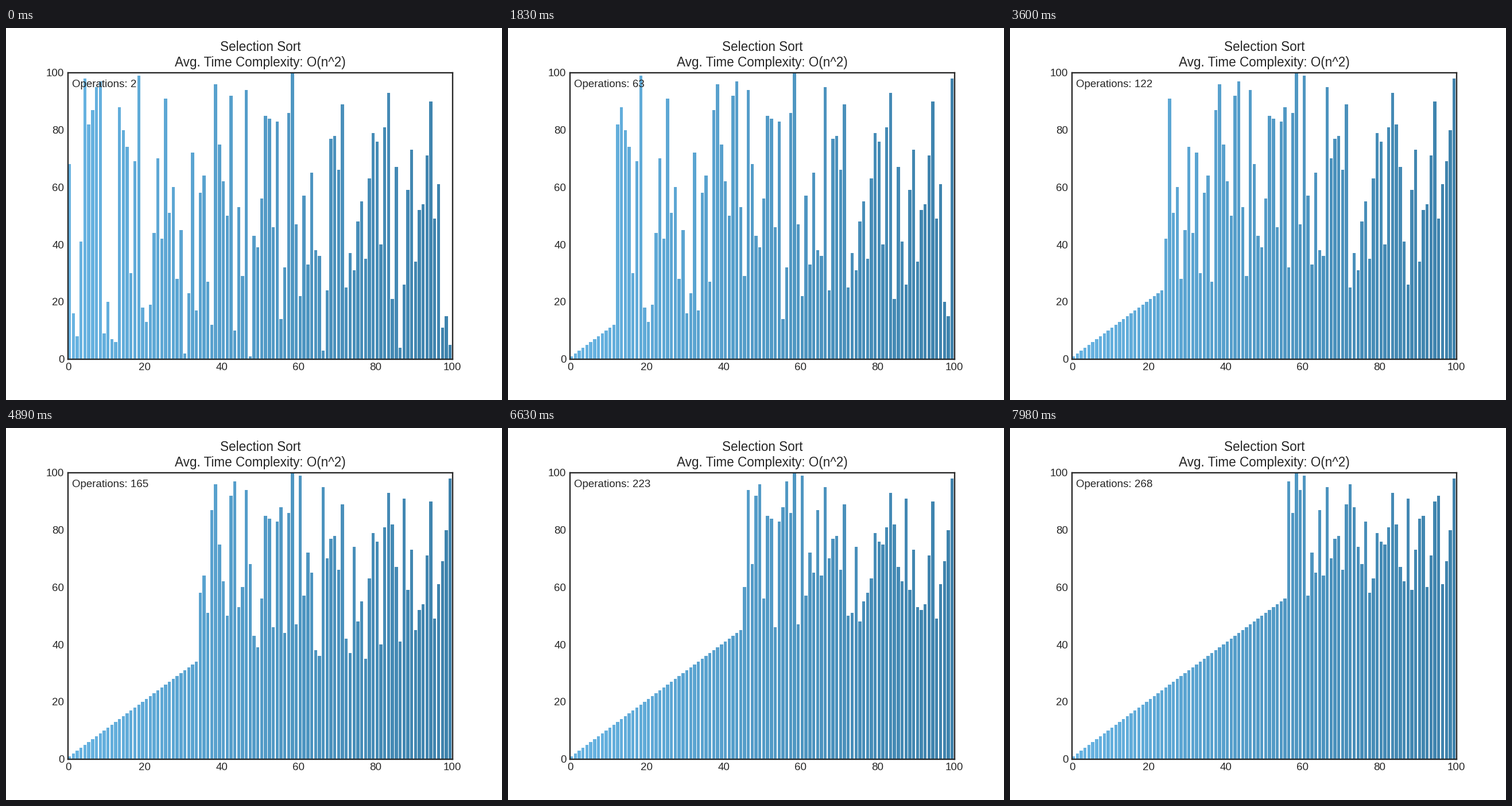
These frames come from a looping animation (864 px wide and 648 px high, 8000 ms). A matplotlib script:

```python
import matplotlib.pyplot as plt
import numpy as np
from matplotlib.animation import FuncAnimation

LOOP_MS = 8000
STEPS = 267
FIRST_OP = 2
INK = "0.15"

START = [
    68, 16, 8, 41, 98, 82, 87, 95, 97, 9,
    20, 7, 6, 88, 80, 74, 30, 69, 99, 18,
    13, 19, 44, 70, 42, 91, 51, 60, 28, 45,
    2, 23, 72, 17, 58, 64, 27, 12, 96, 75,
    62, 50, 92, 10, 53, 29, 94, 1, 43, 39,
    56, 85, 84, 46, 83, 14, 32, 86, 100, 47,
    22, 57, 33, 65, 38, 36, 3, 24, 77, 78,
    66, 89, 25, 37, 31, 48, 55, 35, 63, 79,
    76, 40, 81, 93, 21, 67, 4, 26, 59, 73,
    34, 52, 54, 71, 90, 49, 61, 11, 15, 5,
]


def selection_sort(values):
    """Yield the list after each new minimum and after each swap."""
    a = list(values)
    for i in range(len(a) - 1):
        low = i
        for j in range(i + 1, len(a)):
            if a[j] < a[low]:
                low = j
                yield list(a)
        a[i], a[low] = a[low], a[i]
        yield list(a)


states = list(selection_sort(START))
count = len(START)

plt.rcParams.update({
    "font.family": "Liberation Sans",
    "font.size": 10,
    "text.color": INK,
    "axes.edgecolor": INK,
    "axes.linewidth": 1.25,
    "axes.titlesize": 12,
    "xtick.color": INK,
    "ytick.color": INK,
    "xtick.major.size": 0,
    "ytick.major.size": 0,
})

fig, ax = plt.subplots(figsize=(6.4, 4.8), dpi=135)
fig.subplots_adjust(left=0.125, right=0.9, bottom=0.11, top=0.88)

light = np.array([104, 180, 226]) / 255
dark = np.array([62, 130, 172]) / 255
colors = [light + (dark - light) * k / (count - 1) for k in range(count)]

bars = ax.bar(range(count), START, width=0.8, align="edge", color=colors)
ax.set_xlim(0, 100)
ax.set_ylim(0, 100)
ax.set_title("Selection Sort\nAvg. Time Complexity: O(n^2)")
label = ax.text(0.01, 0.95, "", transform=ax.transAxes)


def update(frame):
    op = FIRST_OP + frame
    for bar, height in zip(bars, states[op - 1]):
        bar.set_height(height)
    label.set_text(f"Operations: {op}")
    return [*bars, label]


anim = FuncAnimation(fig, update, frames=STEPS, interval=LOOP_MS / STEPS,
                     init_func=lambda: update(0), repeat=True,
                     repeat_delay=0, blit=False)
plt.show()
```
